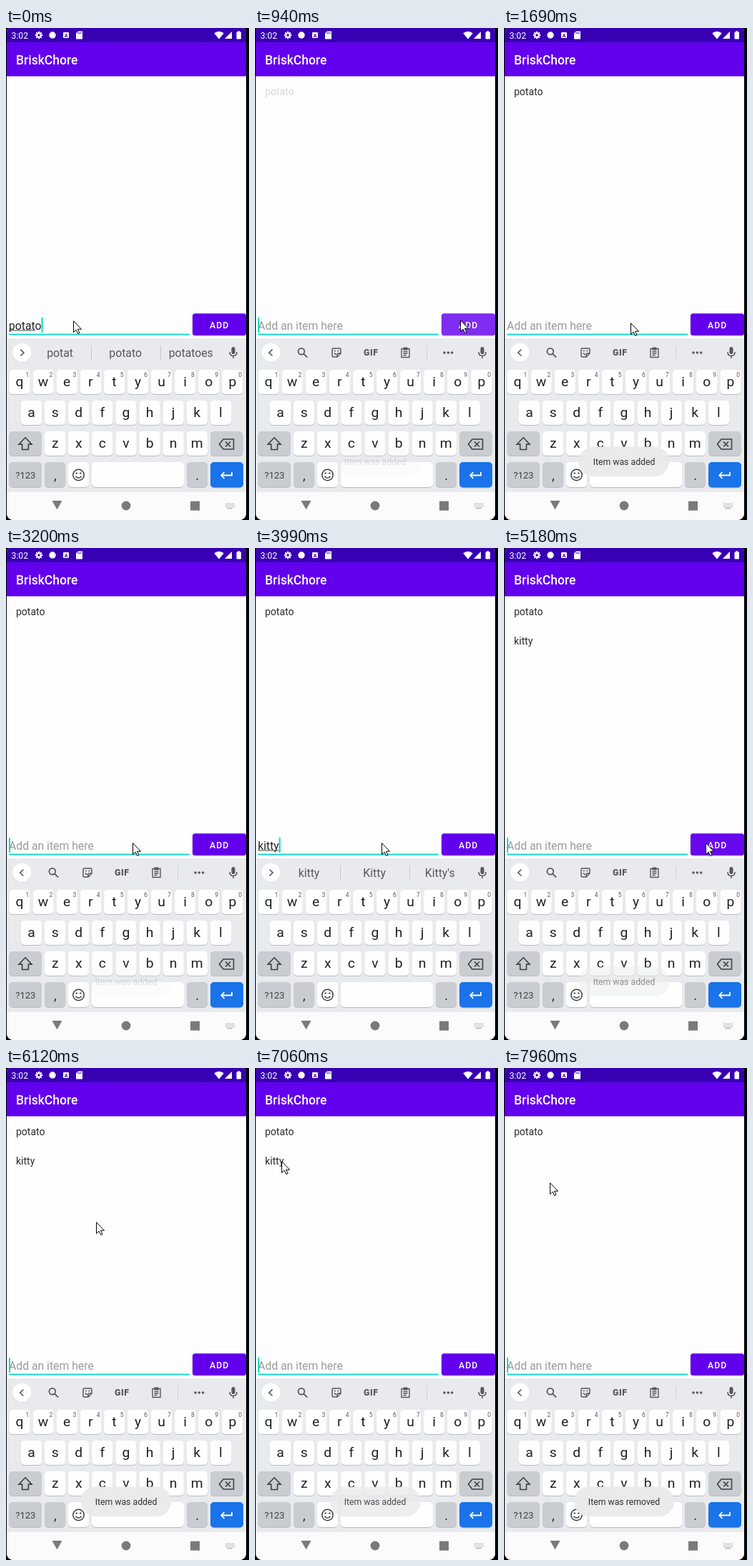
An HTML page with a canvas for the animation above (8000 ms loop, 340x688 px).

```html
<!DOCTYPE html>
<html lang="en">
<head>
<meta charset="utf-8">
<title>To-do list</title>
<style>
html, body { margin: 0; width: 100%; height: 100%; overflow: hidden; background: #000; }
canvas { display: block; width: 340px; height: 688px; }
</style>
</head>
<body>
<canvas id="stage"></canvas>
<script>
const W = 340, H = 688, LOOP = 8000;
const canvas = document.getElementById('stage');
const ratio = window.devicePixelRatio || 1;
canvas.width = W * ratio;
canvas.height = H * ratio;
const c = canvas.getContext('2d');

const PURPLE = '#6200ee', DARK = '#3700b3', TEAL = '#03dac5', GREY = '#55585c';
const INK = '#202124', ICON = '#3c4043', PANEL = '#e8eaed', KEY = '#fefefe', FUNC = '#c9ccd1';

const STEP = 120;      // the screen is refreshed in steps of this length
const KEY_TIME = 100;  // between two typed letters
const LAG = 270;       // suggestions trail the typing
const BLINK = 487;
const TOAST_TIME = 2010;
const REMOVED = 7600;

const potato = { text: 'potato', more: 'potatoes', typed: -675, added: 920 };
const kitty = { text: 'kitty', more: "Kitty's", typed: 3320, added: 5030 };

const home = { x: 94, y: 409 };
const moves = [
  { start: 550, steps: 2, x: 287, y: 408 },
  { start: 1180, steps: 3, x: 177, y: 412 },
  { start: 4520, steps: 3, x: 282, y: 412 },
  { start: 5850, steps: 3, x: 126, y: 215 },
  { start: 6400, steps: 5, x: 37, y: 130 },
  { start: 7840, steps: 2, x: 64, y: 160 }
];

const clamp = v => Math.min(1, Math.max(0, v));
const ramp = (t, start) => clamp((t - start) / STEP);
const stepped = (t, start, n) => clamp((Math.floor((t - start) / STEP) + 1) / n);
const fade = (t, start) => (1 - Math.cos(Math.PI * stepped(t, start, 4))) / 2;

function pointerAt(t) {
  let { x, y } = home;
  for (const m of moves) {
    const k = Math.sin(stepped(t, m.start, m.steps) * Math.PI / 2);
    x += (m.x - x) * k;
    y += (m.y - y) * k;
  }
  return [Math.round(x), Math.round(y)];
}

function lettersOf(word, t) {
  return word.text.slice(0, Math.max(0, Math.floor((t - word.typed) / KEY_TIME) + 1));
}

function inputAt(t) {
  const word = t < potato.added ? potato : kitty;
  if (t >= word.added) return { typed: '', marked: '' };
  return { word, typed: lettersOf(word, t), marked: lettersOf(word, t - LAG) };
}

function caretOn(t, typed) {
  const last = t < kitty.added ? potato.added : kitty.added;
  return typed || Math.floor((t - last) / BLINK) % 2 === 0;
}

function text(s, x, y, size, color, align = 'left', weight = 400) {
  c.font = `${weight} ${size}px Roboto, sans-serif`;
  c.textAlign = align;
  c.fillStyle = color;
  c.fillText(s, x, y);
  return c.measureText(s).width;
}

function rect(x, y, w, h, color) {
  c.fillStyle = color;
  c.fillRect(x, y, w, h);
}

function round(x, y, w, h, r, color) {
  c.fillStyle = color;
  c.beginPath();
  c.roundRect(x, y, w, h, r);
  c.fill();
}

function disc(x, y, r, color) {
  c.fillStyle = color;
  c.beginPath();
  c.arc(x, y, r, 0, 7);
  c.fill();
}

function shape(d, x, y, fill, stroke, width = 1.5) {
  const p = new Path2D(d);
  c.save();
  c.translate(x, y);
  if (fill) { c.fillStyle = fill; c.fill(p); }
  if (stroke) { c.strokeStyle = stroke; c.lineWidth = width; c.stroke(p); }
  c.restore();
}

function faded(alpha, draw) {
  if (alpha <= 0) return;
  c.save();
  c.globalAlpha = alpha;
  draw();
  c.restore();
}

function statusBar() {
  rect(0, 0, W, 20, DARK);
  text('3:02', 7.5, 14.5, 12.2, '#fff');
  disc(46, 10, 3.6, '#fff');
  for (let i = 0; i < 8; i++) {
    c.save();
    c.translate(46, 10);
    c.rotate(i * Math.PI / 4);
    rect(-1.1, -5.2, 2.2, 3, '#fff');
    c.restore();
  }
  disc(46, 10, 1.7, DARK);
  disc(65, 10, 4.7, '#fff');
  round(80, 6, 8, 8, 1, '#fff');
  text('A', 84, 12.8, 7, DARK, 'center', 700);
  shape('M-1.5 -5.5H4.5V5.5H-4.5V-2.5Z', 102.5, 10, '#fff');
  for (let i = 0; i < 3; i++) rect(100.5 + i * 2, 6, 1, 2.2, DARK);
  shape('M0 5.5L-6.8 -2.7Q0 -7.8 6.8 -2.7Z', 298, 10, '#fff');
  shape('M5 -5V5H-5Z', 311, 10, '#fff');
  round(322.5, 5.5, 6.5, 10, 1, '#fff');
  rect(324.3, 4.3, 3, 2, '#fff');
}

function appBar() {
  rect(0, 20, W, 47.5, PURPLE);
  text('BriskChore', 14, 51, 17.5, '#fff', 'left', 500);
}

function list(t) {
  faded(ramp(t, potato.added), () => text(potato.text, 14, 94, 14, '#2b2b2b'));
  faded(ramp(t, kitty.added) - ramp(t, REMOVED), () => text(kitty.text, 14, 135, 14, '#2b2b2b'));
}

function entry(t, { typed, marked }) {
  const width = text(typed, 4, 421.5, 15.75, '#222');
  if (!typed) text('Add an item here', 4, 421.5, 15.75, '#9b9b9b');
  rect(4, 422.5, c.measureText(marked).width, 1, '#444');
  rect(4, 427.6, 253, 1.8, TEAL);
  if (caretOn(t, typed)) rect(4 + width, 405, 2, 21, TEAL);
}

function addButton(t) {
  const box = color => round(261, 399.3, 75, 30.5, 3.5, color);
  const since = t - (t < kitty.added ? potato.added : kitty.added);
  c.save();
  c.shadowColor = 'rgba(0,0,0,.3)';
  c.shadowBlur = 2 * ratio;
  c.shadowOffsetY = ratio;
  box(PURPLE);
  c.restore();
  if (since >= 0) faded(.24 * Math.exp(-since / 70), () => box('#fff'));
  c.letterSpacing = '1.1px';
  text('ADD', 285, 419.5, 12.25, '#fff', 'left', 500);
  c.letterSpacing = '0px';
}

function toolbar() {
  shape('M3.4 3.4L8.3 8.3M4.4 0A4.4 4.4 0 1 1 -4.4 0A4.4 4.4 0 1 1 4.4 0', 64.8, 452.3, null, GREY, 1.8);
  shape('M-4.5 -6H4.5Q6 -6 6 -4.5V1L1 6H-4.5Q-6 6 -6 4.5V-4.5Q-6 -6 -4.5 -6M6 1H2.5Q1 1 1 2.5V6M-3 .5Q-1.5 3 0 2', 114, 454, null, GREY);
  disc(111.8, 451.5, 1, GREY);
  disc(116.4, 451.5, 1, GREY);
  c.letterSpacing = '.7px';
  text('GIF', 162.3, 458.2, 12.2, GREY, 'center', 900);
  c.letterSpacing = '0px';
  shape('M-5.5 -5.5H5.5V6.5H-5.5ZM-3 -1.5H3M-3 1H3M-3 3.5H1', 210.5, 454, null, GREY, 1.4);
  rect(207.5, 446.5, 6, 4, GREY);
  rect(240, 444, 1, 20, '#cfd1d5');
  for (let i = -1; i < 2; i++) disc(270.3 + i * 5.3, 454, 1.8, GREY);
}

function suggestions({ word, marked }) {
  const done = marked === word.text;
  const middle = done ? marked[0].toUpperCase() + marked.slice(1) : word.text;
  [marked, middle, word.more].forEach((s, i) => {
    text(s, 75.5 + i * 91.6, 460, 15.75, GREY, 'center');
    if (i) rect(22 + i * 97, 444, 1, 20, '#c6c8cc');
  });
}

function strip(input) {
  disc(22.3, 454.4, 13, '#d8dadd');
  disc(22.3, 453.8, 13, '#fff');
  const side = input.marked ? 1 : -1;
  shape(`M${-2 * side} -4.5L${2.5 * side} 0L${-2 * side} 4.5`, 22.3, 454, null, GREY, 1.7);
  if (input.marked) suggestions(input);
  else toolbar();
  round(315.5, 446, 5, 10, 2.5, GREY);
  shape('M-5 -1Q-5 4.5 0 4.5Q5 4.5 5 -1M0 4.5V8', 318, 454, null, GREY, 1.5);
}

function keyCap(x, y, w, h, color = KEY) {
  round(x, y + 1, w, h, 5, '#babdc2');
  round(x, y, w, h, 5, color);
}

function keyRow(letters, firstX, y, digits) {
  [...letters].forEach((l, i) => {
    const x = firstX + i * 33.1;
    keyCap(x - 14.7, y, 29.4, 34);
    text(l, x, y + 23, 19.25, INK, 'center');
    if (digits) text((i + 1) % 10, x + 10.8, y + 9.5, 8.5, GREY, 'center');
  });
}

function keyboard() {
  ['qwertyuiop', 'asdfghjkl', 'zxcvbnm'].forEach((row, i) =>
    keyRow(row, 19 + (10 - row.length) * 16.55, 478 + i * 43, i === 0));

  keyCap(4.5, 564, 45.5, 34, FUNC);
  shape('M0 -8.7L9 .6H4.4V8H-4.4V.6H-9Z', 27, 581.5, null, ICON, 1.6);
  keyCap(286, 564, 45.5, 34, FUNC);
  shape('M-10 0L-4.5 -7H10V7H-4.5ZM-1.5 -3.5L5.5 3.5M5.5 -3.5L-1.5 3.5', 308.5, 582, null, ICON, 1.6);

  keyCap(4.5, 607, 45.5, 35, FUNC);
  text('?123', 27.3, 630, 13, ICON, 'center');
  keyCap(54.2, 607, 29, 35, FUNC);
  text(',', 68.8, 632, 18, INK, 'center');
  keyCap(87, 607, 29.3, 35);
  shape('M7.7 0A7.7 7.7 0 1 1 -7.7 0A7.7 7.7 0 1 1 7.7 0M-4 1.8Q0 6.8 4 1.8', 101.5, 625, null, ICON);
  disc(98.7, 622.6, 1.2, ICON);
  disc(104.3, 622.6, 1.2, ICON);
  keyCap(120, 607, 129, 35);
  keyCap(253, 607, 29, 35, FUNC);
  text('.', 267.5, 632, 18, INK, 'center');
  keyCap(286, 607, 46, 35.5, '#1a73e8');
  shape('M7.5 -4V.5H-7M-3 -4L-7.3 .5L-3 5', 308.5, 625, null, '#fff', 1.8);
}

function navBar() {
  rect(0, 649, W, 39, '#fbfbfb');
  shape('M-7 -6.5H7L0 6Z', 71.5, 667.5, '#7a7a7a');
  disc(168, 668, 6.4, '#7a7a7a');
  rect(258, 661.7, 13, 13, '#7a7a7a');
  for (let i = 0; i < 18; i++)
    rect(307 + i % 6 * 2.3, 664.5 + Math.floor(i / 6) * 2.2, 1.2, 1.2, '#a5a5a5');
  rect(309.5, 671, 7.5, 1.2, '#a5a5a5');
}

function toast(t, message, start) {
  faded(fade(t, start) - fade(t, start + TOAST_TIME), () => {
    c.font = '12.25px Roboto, sans-serif';
    const w = c.measureText(message).width + 40;
    round(168 - w / 2, 585.5, w, 41.5, 20.7, 'rgba(233,235,237,.97)');
    text(message, 168, 611.3, 12.25, '#303236', 'center');
  });
}

function arrow(t) {
  const [x, y] = pointerAt(t);
  shape('M.5 .7V16.5L4.1 13.1L6.7 18.5L9 17.4L6.5 12.2H11.5Z', x, y, '#fff', '#000', 1);
}

function draw(t) {
  const input = inputAt(t);
  c.setTransform(ratio, 0, 0, ratio, 0, 0);
  rect(0, 0, W, H, '#000');
  c.save();
  c.beginPath();
  c.roundRect(1, 0, 335, H, [5, 5, 9, 9]);
  c.clip();
  rect(0, 0, W, H, '#fefefe');
  statusBar();
  appBar();
  list(t);
  entry(t, input);
  addButton(t);
  rect(0, 434, W, 215, PANEL);
  strip(input);
  keyboard();
  navBar();
  toast(t, 'Item was added', potato.added);
  toast(t, 'Item was added', kitty.added);
  toast(t, 'Item was removed', REMOVED);
  arrow(t);
  c.restore();
}

const start = performance.now();
function tick() {
  draw((performance.now() - start) % LOOP);
  requestAnimationFrame(tick);
}
tick();
</script>
</body>
</html>
```
